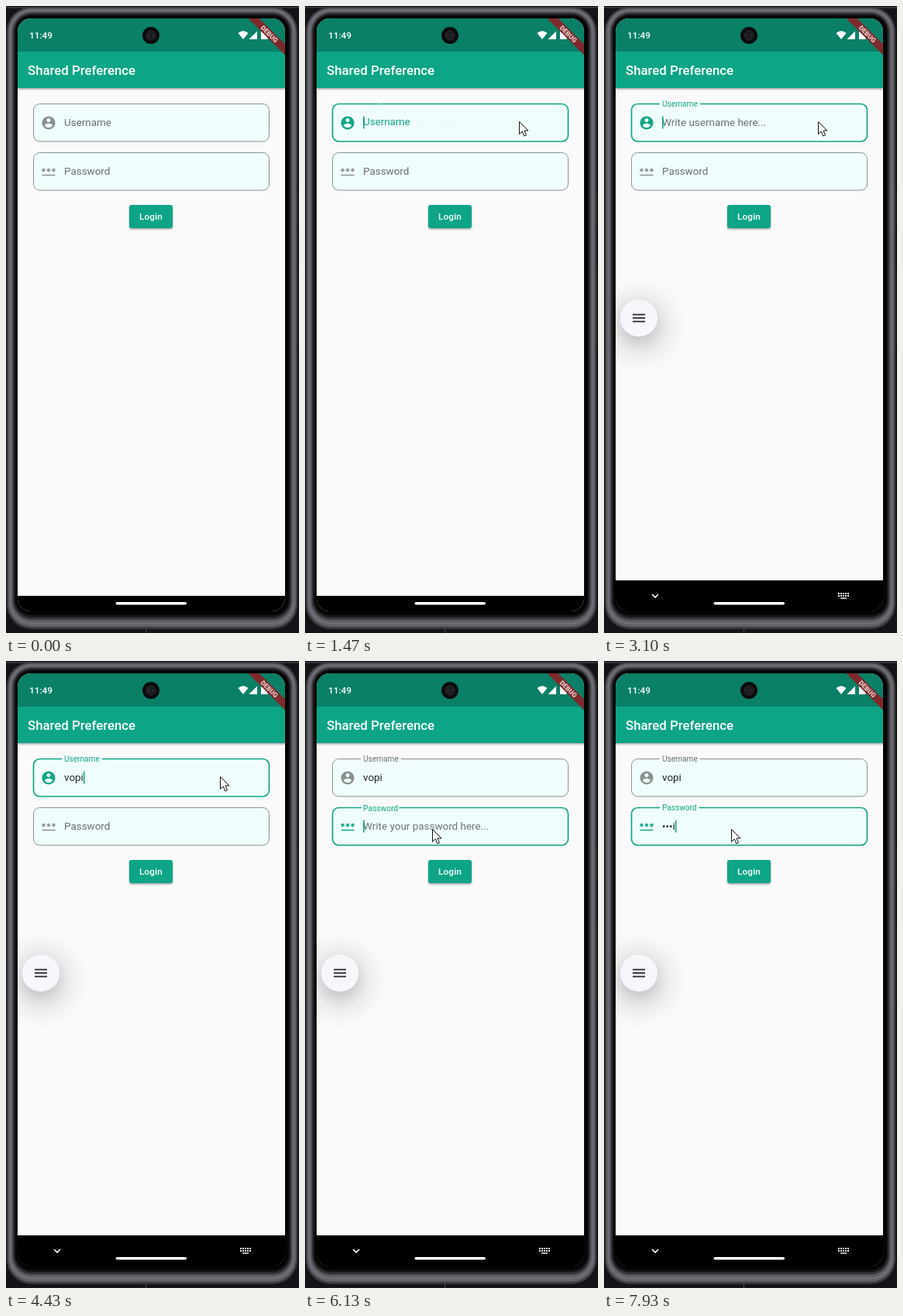
An HTML page for the animation above (8000 ms loop, 378 by 810 pixels).

```html
<!DOCTYPE html>
<html lang="en">
<head>
<meta charset="utf-8">
<title>Login form</title>
<style>
  html, body { margin: 0; width: 100%; height: 100%; overflow: hidden; background: #141418; }
  svg { display: block; width: 378px; height: 810px; font-family: Roboto, sans-serif; }
  text { white-space: pre; }
  .body { font-size: 13.44px; }
  .medium { font-weight: 500; fill: #fff; }
</style>
</head>
<body>
<svg viewBox="0 0 378 810">
  <defs>
    <clipPath id="screen"><rect x="15" y="16" width="345" height="766" rx="17"/></clipPath>
    <radialGradient id="glow">
      <stop offset=".25" stop-color="#9c9ca4" stop-opacity=".5"/>
      <stop offset=".6" stop-color="#b4b4bc" stop-opacity=".2"/>
      <stop offset="1" stop-color="#ccccd2" stop-opacity="0"/>
    </radialGradient>
    <filter id="drop" x="-20%" y="-20%" width="140%" height="160%">
      <feDropShadow dx="0" dy="1.5" stdDeviation="1.2" flood-color="#333" flood-opacity=".45"/>
    </filter>
    <path id="star" d="M0-2.500V2.500M-2.200-1.250L2.200 1.250M-2.200 1.250L2.200-1.250" stroke-width="1.2"/>
  </defs>

  <path d="M0 2H378M180.500 804V810" stroke="#505056"/>
  <g id="bezel"></g>
  <path d="M377 238V285M377 338V441" stroke="#18181a" stroke-width="2"/>

  <g clip-path="url(#screen)">
    <path d="M15 16H360V782H15Z" fill="#fafafa"/>
    <path d="M15 59H360V106H15Z" fill="#10a586" filter="url(#drop)"/>
    <path d="M15 16H360V59H15Z" fill="#0a8067"/>
    <text class="medium" x="30" y="42" font-size="11.8">11:49</text>
    <text class="medium" x="28" y="89" font-size="16.8">Shared Preference</text>
    <path d="M299.500 35Q306 29.500 312.500 35L306 43ZM313.500 43H324V32.500ZM329 33H331.500V31.500H335V33H337.500V43H329Z" fill="#fff"/>
    <g transform="translate(360 16) rotate(45)">
      <path d="M-40 23.500H40V33.600H-40Z" fill="#7e2a2c"/>
      <text y="31.500" font-size="8.500" font-weight="900" text-anchor="middle" fill="#e8d2d0">DEBUG</text>
    </g>
    <circle cx="187" cy="38" r="11" fill="#0b0b0d"/>
    <circle cx="187" cy="38" r="6" fill="#1c1c20" stroke="#2c2c32"/>
    <path d="M184 38h1M189 38h1" stroke="#77777c"/>

    <g id="fields"></g>
    <rect x="159" y="257" width="56" height="30" rx="3" fill="#10a586" filter="url(#drop)"/>
    <text class="medium" x="187" y="276" font-size="11.8" letter-spacing=".1" text-anchor="middle">Login</text>

    <g id="fab">
      <circle cy="9" r="62" fill="url(#glow)"/>
      <circle r="24" fill="#f5f7fb"/>
      <path d="M-8-4.500H8M-8 0H8M-8 4.500H8" stroke="#26282c" stroke-width="1.700"/>
    </g>
    <path d="M15 762H360V790H15Z"/>
    <g id="panel">
      <path d="M15 0H360V50H15Z"/>
      <path d="M62 18L66 22L70 18" fill="none" stroke="#fff" stroke-width="1.600"/>
      <path d="M302 17H316M302 20H316" stroke="#eee" stroke-width="1.800" stroke-dasharray="2 1"/>
      <path d="M305 23H313" stroke="#eee" stroke-width="1.600"/>
    </g>
    <rect x="141.500" y="770" width="91.500" height="3.400" rx="1.700" fill="#fff"/>
  </g>
  <path id="pointer" d="M0 0V16L3.800 12.500L6.300 18.500L9 17.400L6.500 11.500H11.500Z" fill="#fff" stroke="#111"/>
</svg>

<script>
const LOOP = 8000, ACCENT = '#10a586', BORDER = '#8a9090', LABEL = '#667070';
const NAME = 'vopi';
const $ = id => document.getElementById(id);
const clamp = v => Math.max(0, Math.min(1, v));
const progress = (t, start, length) => clamp((t - start) / length);
const easeOut = k => 1 - (1 - k) ** 3;
const smooth = k => k * k * (3 - 2 * k);
const mix = (a, b, k) => a + (b - a) * k;

$('bezel').innerHTML = ['#3c3c40', '#606066', '#6e6e75', '#5c5c62', '#36363a', '#161618', '#040404']
  .map((color, i) => {
    const d = i * 1.9;
    return `<rect x="${1 + d}" y="${1 + d}" width="${375 - 2 * d}" height="${804 - 2.6 * d}" rx="${32 - d}" fill="${color}"/>`;
  }).join('');

const accountIcon = `<path transform="translate(44.800 14.800) scale(.85)" fill="currentColor" d="M12 2C6.480 2 2 6.480 2 12s4.480 10 10 10 10-4.480 10-10S17.520 2 12 2zm0 3c1.660 0 3 1.340 3 3s-1.340 3-3 3-3-1.340-3-3 1.340-3 3-3zm0 14.200c-2.500 0-4.710-1.280-6-3.220.030-1.990 4-3.080 6-3.080 1.990 0 5.970 1.090 6 3.080-1.290 1.940-3.500 3.220-6 3.220z"/>`;
const passwordIcon = `<g stroke="currentColor">${[48.5, 55, 61.5]
  .map(x => `<use href="#star" x="${x}" y="23"/>`).join('')}<path d="M46.500 29.500H63.500" stroke-width="1.700"/></g>`;

function makeField(y, label, hint, icon, options) {
  const group = document.createElementNS('http://www.w3.org/2000/svg', 'g');
  group.setAttribute('transform', `translate(0 ${y})`);
  group.innerHTML = `
    <rect class="box" x="35.500" y=".500" width="304" height="48.500" rx="8" fill="#f0fdfd"/>
    <path class="gap" stroke="#f6fcfc" stroke-width="3"/>
    <g class="icon">${icon}</g>
    <text class="hint body" x="75" y="29" fill="${LABEL}">${hint}</text>
    <text class="value body" x="75" y="29" fill="#202424"></text>
    <text class="label body">${label}</text>
    <path class="caret" stroke="${ACCENT}" stroke-width="1.600"/>`;
  $('fields').append(group);
  const part = name => group.querySelector('.' + name);
  const set = (name, attributes) => {
    for (const key in attributes) part(name).setAttribute(key, attributes[key]);
  };
  const labelWidth = part('label').getComputedTextLength() * .75;

  return t => {
    const { focus, blur, keys, caretOn, secret } = options;
    const focused = t >= focus && t < blur;
    const float = easeOut(progress(t, focus, 200));
    const count = keys.filter(k => t >= k).length;
    const typed = NAME.slice(0, count);
    part('value').textContent = secret && count ? '•'.repeat(count - 1) + typed.at(-1) : typed;
    set('box', { stroke: focused ? ACCENT : BORDER, 'stroke-width': focused ? 1.7 : 1 });
    const middle = 75 + labelWidth / 2, half = (labelWidth / 2 + 3) * float;
    set('gap', { d: `M${middle - half} .500H${middle + half}`, opacity: float > 0 ? 1 : 0 });
    set('icon', { color: focused ? ACCENT : BORDER });
    set('hint', { opacity: count ? 0 : float });
    set('label', {
      transform: `translate(75 ${mix(28.5, 4.4, float)}) scale(${mix(1, .75, float)})`,
      fill: focused ? ACCENT : LABEL
    });
    const x = 75.8 + (count ? part('value').getComputedTextLength() : 0);
    set('caret', { d: `M${x} 16.500V32.500`, opacity: focused && caretOn(t) ? 1 : 0 });
  };
}

const fields = [
  makeField(126, 'Username', 'Write username here...', accountIcon, {
    focus: 1470, blur: 6000, keys: [3770, 3990, 4200, 4400],
    caretOn: t => t < 1870 || t >= 2970
  }),
  makeField(189, 'Password', 'Write your password here...', passwordIcon, {
    focus: 6000, blur: LOOP, keys: [6830, 7030, 7270, 7900], secret: true,
    caretOn: t => t >= 6060
  })
];

// time, x, y
const pointerPath = [
  [30, 402, 132], [470, 349.5, 140.5], [830, 306.5, 145], [930, 276.5, 149.5],
  [5000, 276.5, 149.5], [5600, 164.5, 217.5], [LOOP, 164.5, 217.5]
];

function pointerAt(t) {
  const next = Math.max(1, pointerPath.findIndex(p => t < p[0]));
  const [a, b] = [pointerPath[next - 1], pointerPath[next]];
  const raw = progress(t, a[0], b[0] - a[0]);
  const k = a[0] === 5000 ? smooth(raw) : raw;
  return [mix(a[1], b[1], k), mix(a[2], b[2], k)];
}

function draw(now) {
  const t = now % LOOP;
  fields.forEach(update => update(t));
  const rise = easeOut(progress(t, 1870, 450));
  const top = mix(762, 742, rise);
  $('panel').setAttribute('transform', `translate(0 ${top})`);
  $('panel').setAttribute('opacity', t >= 1870 ? 1 : 0);
  $('fab').setAttribute('transform', `translate(${mix(39.5, 45, rise)} ${top - 338.8}) scale(${mix(.7, 1, rise)})`);
  $('fab').setAttribute('opacity', progress(t, 1870, 100));
  $('pointer').setAttribute('transform', `translate(${pointerAt(t)})`);
  requestAnimationFrame(draw);
}
requestAnimationFrame(draw);
</script>
</body>
</html>
```
